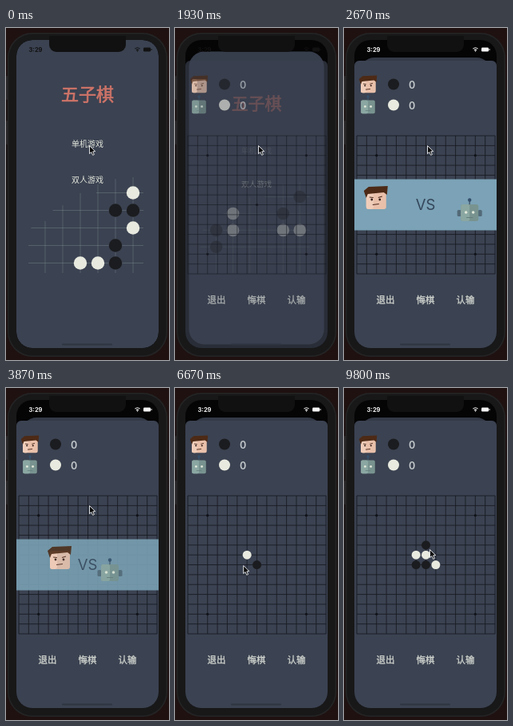
Animation of 204 by 416 pixels, one loop 9870 ms. Source, as an HTML page with a canvas:

```html
<!DOCTYPE html>
<html lang="zh">
<head>
<meta charset="utf-8">
<title>五子棋</title>
<style>
html, body { margin: 0; width: 100%; height: 100%; overflow: hidden; background: #17100f; }
canvas { display: block; width: 204px; height: 416px; }
</style>
</head>
<body>
<canvas id="stage"></canvas>
<script>
const LOOP = 9870, W = 204, H = 416;
const CJK = '"Noto Sans CJK SC", "Noto Sans CJK", sans-serif', LATIN = 'Inter, Roboto, sans-serif';
const SLATE = '#3b4251', BLACK = '#1b1c1f', WHITE = '#e8eae0';
const canvas = document.getElementById('stage');
const dpr = window.devicePixelRatio || 1;
canvas.width = W * dpr;
canvas.height = H * dpr;
const c = canvas.getContext('2d');

const lerp = (a, b, p) => a + (b - a) * p;
const ramp = (t, a, b) => Math.min(1, Math.max(0, (t - a) / (b - a)));
const ease = p => p * p * (3 - 2 * p);
const glide = (t, a, b) => ease(ramp(t, a, b));

function box(x, y, w, h, color, r = 0) {
  c.fillStyle = color;
  c.beginPath();
  c.roundRect(x, y, w, h, r);
  c.fill();
}
function disc(x, y, r, color) {
  c.fillStyle = color;
  c.beginPath();
  c.arc(x, y, r, 0, 7);
  c.fill();
}
function shape(path, color) {
  c.fillStyle = color;
  c.fill(new Path2D(path));
}
function line(x1, y1, x2, y2) {
  c.beginPath();
  c.moveTo(x1, y1);
  c.lineTo(x2, y2);
  c.stroke();
}
function pen(color, width) {
  c.strokeStyle = color;
  c.lineWidth = width;
}
// Centred text; a thin outline gives weights between regular and bold.
function text(s, x, y, size, color, { weight = 400, family = CJK, outline = 0 } = {}) {
  c.font = `${weight} ${size}px ${family}`;
  c.textAlign = 'center';
  c.fillStyle = color;
  c.fillText(s, x, y + size * 0.37);
  if (outline) {
    pen(color, outline);
    c.strokeText(s, x, y + size * 0.37);
  }
}
function at(x, y, scale, drawPart) {
  c.save();
  c.translate(x, y);
  c.scale(scale, scale);
  drawPart();
  c.restore();
}

function phone() {
  const wall = c.createLinearGradient(0, 0, 0, H);
  wall.addColorStop(0, '#1f1110');
  wall.addColorStop(0.5, '#191516');
  wall.addColorStop(1, '#1f1110');
  box(0, 0, W, H, wall);
  for (const y of [60, 116]) box(0, y, 4, 30, '#2a2729', 1);
  box(2, 6, 200, 406, '#242425', 31);
  box(3.5, 7.5, 197, 403, '#181819', 30);
}

function statusBar(light) {
  const v = Math.round(lerp(18, 245, light)), color = `rgb(${v},${v},${v})`;
  text('3:29', 37, 27, 7.5, color, { weight: 700, family: LATIN });
  pen(color, 1.1);
  for (const r of [2.3, 4.6]) {
    c.beginPath();
    c.arc(164.5, 29.5, r, -2.3, -0.84);
    c.stroke();
  }
  disc(164.5, 29, 0.8, color);
  box(172, 24.5, 9, 5, color, 1.2);
  box(181.5, 26, 1, 2, color);
}

// Cells of the home grid, six to a row, before and after the stones move.
const homeStones = [
  { color: WHITE, from: [5, 17, 26, 27], to: [17, 16, 13, 7] },
  { color: BLACK, from: [10, 11, 22, 28], to: [10, 5, 12, 18] }
];
function home(t) {
  const hx = col => 49 + 22 * col, hy = row => 206.5 + 22 * row;
  box(13, 15, 178, 386, SLATE, 20);
  text('五子棋', 102, 83, 22, '#cf7468', { outline: 0.7 });
  text('单机游戏', 102, 145.5, 10, t < 1670 ? '#e2e6dc' : 'rgba(226,230,220,.3)');
  text('双人游戏', 102, 190, 10, '#e2e6dc');
  pen('rgba(150,170,170,.42)', 0.7);
  for (let i = 0; i < 6; i++) line(hx(i), 187 + 2.2 * (5 - i) ** 2, hx(i), 307);
  for (let i = 0; i < 5; i++) line(28 + 85 * Math.max(0, 1 - i / 2.5) ** 2, hy(i), 172, hy(i));
  const p = glide(t, 330, 1200);
  for (const { color, from, to } of homeStones)
    from.forEach((a, i) => {
      const b = to[i];
      disc(hx(lerp(a % 6, b % 6, p)), hy(lerp(a / 6 | 0, b / 6 | 0, p)), 8.2, color);
    });
}

// Both faces are centred on the origin, about 30 units wide.
function person() {
  box(-12, -8, 25, 23, '#e9c0aa', 3);
  box(-12, -8, 9, 23, '#f0cdb9', 3);
  shape('M-15-8 L-9-13 L15-14 L14-3 L10-6 L-10-4 L-12 1 Z', '#4c2a16');
  pen('#4b2a1e', 1.2);
  line(-8, 0, -3, 0.5);
  line(3, 0.5, 8, -1);
  for (const x of [-5, 5]) disc(x, 3, 1.4, '#33211c');
  line(-4, 9.5, 4, 8.5);
}
function robot(ears) {
  box(-0.7, -12, 1.4, 6, '#42586b');
  disc(0, -12.5, 2.2, '#34506c');
  if (ears) for (const x of [-15.5, 10.5]) box(x, 0, 5, 8, '#536a78', 1.5);
  box(-11, -7, 22, 21, '#78938f', 2.5);
  box(-11, -7, 11, 21, '#8ba7a2', 2.5);
  for (const x of [-4.5, 4.5]) disc(x, 3, 1.8, '#dfe6d8');
  box(-4, 9, 8, 1, '#627d7c');
}

// The player moves at a steady pace; the reply comes after its own delay.
const STEP = 12.36, gx = i => 16 + i * STEP, gy = i => 135 + i * STEP;
const turns = [
  { black: [7, 7], white: [6, 6], delay: 730 },
  { black: [6, 7], white: [8, 7], delay: 230 },
  { black: [7, 5], white: [7, 6], delay: 600 }
];
const moveTime = n => 5000 + 1900 * n;

function board(t) {
  pen('#171a22', 0.85);
  for (let i = 0; i < 15; i++) {
    line(gx(i), gy(0), gx(i), gy(14));
    line(gx(0), gy(i), gx(14), gy(i));
  }
  disc(gx(7), gy(7), 1.6, '#101218');
  for (const i of [2, 12]) for (const j of [2, 12]) disc(gx(i), gy(j), 1.6, '#101218');
  turns.forEach(({ black, white, delay }, n) => {
    const since = t - moveTime(n);
    if (since >= 0) disc(gx(black[0]), gy(black[1]), 5.5, BLACK);
    if (since >= delay) disc(gx(white[0]), gy(white[1]), 5.5, WHITE);
  });
}

function banner(t) {
  const shown = ramp(t, 2130, 2400) * (1 - ramp(t, 3800, 4400));
  if (!shown) return;
  const near = glide(t, 2300, 2870) - glide(t, 3870, 4600);
  c.save();
  c.globalAlpha *= shown;
  box(13, 189.5, 178, 64, '#7ba2b6');
  text('VS', 102, 221.5, 18.5, '#34465a', { family: LATIN });
  at(lerp(-30, 67, near), 212, 1, person);
  at(lerp(227, 130, near), 228, 1, () => robot(true));
  c.restore();
}

function game(t) {
  box(13, 41, 178, 380, SLATE, 6);
  at(30, 70, 0.75, person);
  at(30, 96, 0.8, () => robot(false));
  [BLACK, WHITE].forEach((color, i) => {
    disc(62, 70.5 + 26 * i, 7, color);
    text('0', 85, 71 + 26 * i, 12.5, '#c6cbce', { weight: 600, family: LATIN });
  });
  board(t);
  ['退出', '悔棋', '认输'].forEach((s, i) => text(s, 52 + 50 * i, 340.5, 11.4, '#ccd0cb', { outline: 0.35 }));
  banner(t);
}

// The pointer glides to each cell shortly before the stone is placed.
function cursor(t) {
  let x = 104, y = 147;
  const go = (toX, toY, start, end) => {
    const p = glide(t, start, end);
    x = lerp(x, toX, p);
    y = lerp(y, toY, p);
  };
  turns.forEach(({ black: [i, j] }, n) =>
    go(gx(i) - 5, gy(j) + 0.5, moveTime(n) - 1100, moveTime(n) - 250));
  go(107, 202, 9400, 9800);
  at(x, y, 1, () => {
    shape('M.5 .5 V10.5 L2.8 8.5 L4.6 12.3 L6.4 11.5 L4.7 7.8 L7.8 7.6 Z', '#0b0b0c');
    pen('#eef0f2', 0.9);
    c.stroke(new Path2D('M.5 .5 V10.5 L2.8 8.5 L4.6 12.3 L6.4 11.5 L4.7 7.8 L7.8 7.6 Z'));
  });
}

function draw(now) {
  const t = now % LOOP;
  const open = t < 1930 ? 0 : glide(t, 1760, 2040);
  c.setTransform(dpr, 0, 0, dpr, 0, 0);
  phone();
  c.save();
  c.beginPath();
  c.roundRect(13, 15, 178, 386, 20);
  c.clip();
  box(13, 15, 178, 386, '#050506');
  at(102, lerp(15, 37, open), lerp(1, 0.925, open), () => {
    c.translate(-102, -15);
    home(t);
    box(13, 15, 178, 386, `rgba(0,0,0,${0.12 * open})`, 10);
  });
  if (open) {
    c.globalAlpha = open;
    game(t);
    c.globalAlpha = 1;
  }
  box(70, 395.5, 63, 2, '#2f3541', 1);
  c.restore();
  box(54, 10, 96, 20, '#111112', [0, 0, 9, 9]);
  statusBar(ramp(open, 0.7, 1));
  cursor(t);
  requestAnimationFrame(draw);
}
requestAnimationFrame(draw);
</script>
</body>
</html>
```
